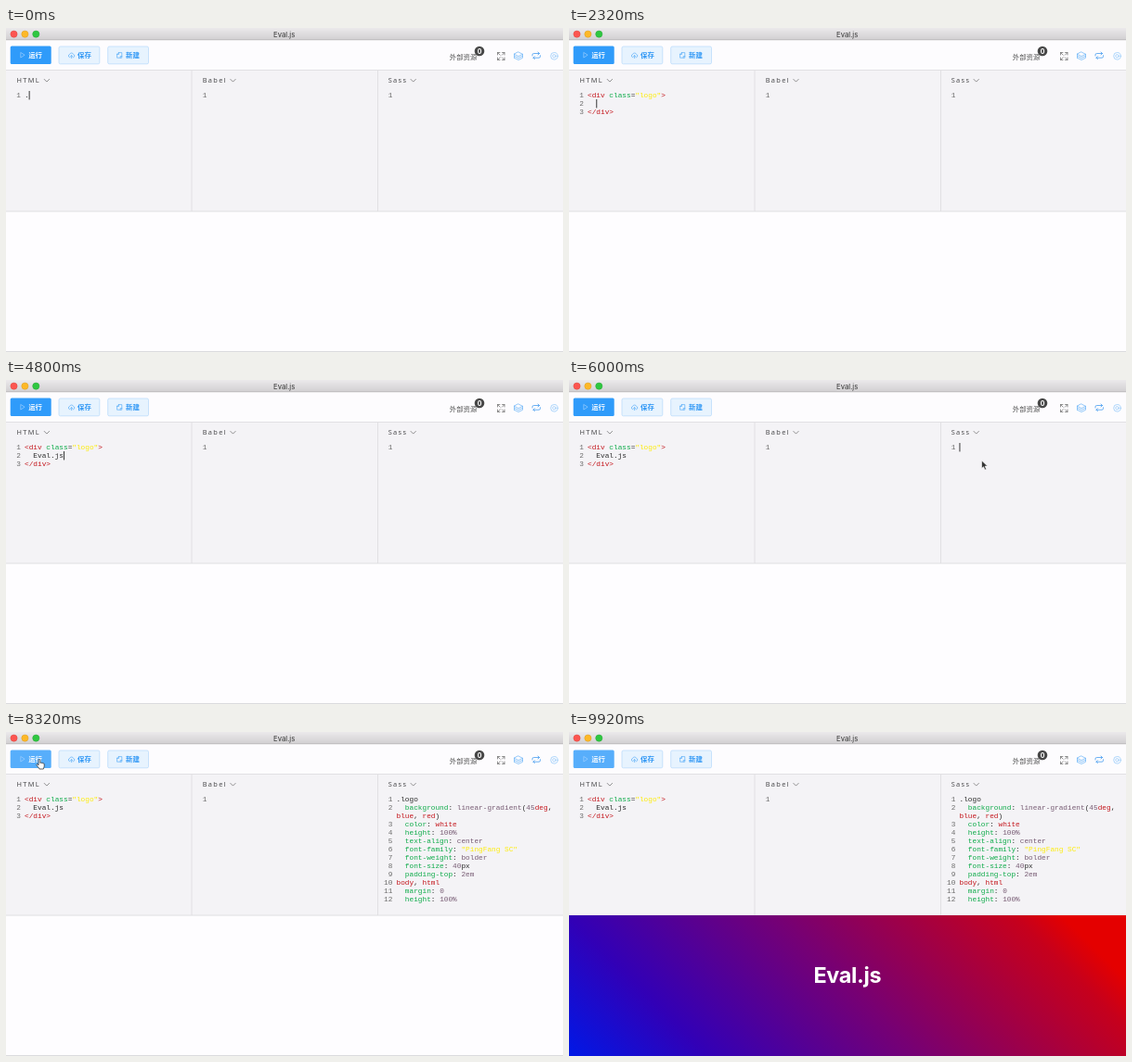
Write an HTML page that moves like this. It is 600 px wide and 350 px high and loops after 10 s.

```html
<!DOCTYPE html>
<html lang="zh">
<head>
<meta charset="utf-8">
<title>Eval.js</title>
<style>
html, body { margin: 0; height: 100%; overflow: hidden; background: #fefdff; }
svg { display: block; width: 600px; height: 350px; }
text { white-space: pre; }
.code { font: 7.78px "Liberation Mono", monospace; fill: #2c2c2c; }
.num { fill: #6c6c6c; text-anchor: end; }
.r { fill: #c4161c; } .g { fill: #0dab49; } .y { fill: #fdec08; } .p { fill: #765a72; }
.head { font: 500 7.4px "Noto Sans", sans-serif; letter-spacing: 1.35px; fill: #4c4c4e; }
.zh { font: 700 7.4px "Noto Sans CJK SC", "Noto Sans CJK", sans-serif; }
.zh .medium { font-weight: 500; }
.line { fill: none; stroke-width: .7; stroke-linejoin: round; stroke-linecap: round; }
</style>
</head>
<body>
<svg viewBox="0 0 600 350">
  <defs>
    <linearGradient id="bar" x2="0" y2="1">
      <stop stop-color="#ebe9eb"/><stop offset="1" stop-color="#d1cfd1"/>
    </linearGradient>
    <linearGradient id="page" gradientUnits="userSpaceOnUse" x1="112.25" y1="462.25" x2="487.75" y2="86.75">
      <stop stop-color="#0018e6"/><stop offset=".2" stop-color="#3200b6"/>
      <stop offset=".5" stop-color="#760074"/><stop offset=".84" stop-color="#c6001c"/>
      <stop offset=".91" stop-color="#e40000"/>
    </linearGradient>
  </defs>

  <rect width="600" height="350" fill="#fefdff"/>
  <rect y="13" width="600" height="33" fill="#fdfcfe"/>
  <rect width="600" height="13" fill="url(#bar)"/>
  <rect y="12.5" width="600" height=".7" fill="#b4b2b4"/>
  <g stroke-width=".5">
    <circle cx="8.5" cy="6.6" r="3.6" fill="#fc5550" stroke="#dd4440"/>
    <circle cx="20.4" cy="6.6" r="3.6" fill="#fdb827" stroke="#dc9c1e"/>
    <circle cx="32.3" cy="6.6" r="3.6" fill="#2fc740" stroke="#22a632"/>
  </g>
  <text x="299.7" y="9.7" text-anchor="middle" font-family="Inter, sans-serif" font-size="7.7" fill="#333">Eval.js</text>

  <rect id="run" x="4.7" y="19.6" width="44" height="19.4" rx="1.5"/>
  <g fill="#e7f3fe" stroke="#b5d9fb" stroke-width=".7">
    <rect x="57" y="20" width="43.8" height="18.8" rx="1.5"/>
    <rect x="109.7" y="20" width="43.8" height="18.8" rx="1.5"/>
  </g>
  <path class="line" stroke="#9ccfff" d="M15.8 26.8v5.2l4-2.6z"/>
  <g class="line" stroke="#5aaef8">
    <path d="M69 31.7h-.3a1.7 1.7 0 0 1 0-3.3 2 2 0 0 1 3.8 0 1.7 1.7 0 0 1 0 3.300h-.4M70.600 32.600v-3m-1 1 1-1 1 1"/>
    <path d="M121.500 26.600h3.300v5.600h-5.200v-3.700zM121.500 26.600v1.900h-1.900M123.200 32.200v-1.700h1.600"/>
  </g>
  <g class="zh" fill="#2f97f5">
    <text x="24.2" y="32.3" fill="#fff">运行</text>
    <text x="77" y="32.3">保存</text>
    <text x="129" y="32.3">新建</text>
    <text class="medium" x="477.8" y="34.2" fill="#555">外部资源</text>
  </g>
  <circle cx="510" cy="25" r="5.3" fill="#484848"/>
  <text x="510" y="27.5" text-anchor="middle" font-family="Inter, sans-serif" font-weight="700" font-size="7" fill="#fff">0</text>
  <path class="line" stroke="#666" d="M529.5 29v-2.5h2.5m2.5 0h2.5v2.5m0 3v2.5h-2.5m-2.5 0h-2.5v-2.5M529.5 26.5l2.7 2.7m4.8-2.7-2.7 2.7m2.7 5.3-2.7-2.7m-4.8 2.7 2.7-2.7"/>
  <path class="line" stroke="#66b2f7" d="M552 26l4.5 2.3-4.5 2.3-4.5-2.3zM547.5 30.3l4.5 2.2 4.5-2.2M547.5 32.3l4.5 2.2 4.5-2.2v-4m-9 0v4"/>
  <path class="line" stroke="#2f90ee" d="M567 30v-1a1.500 1.500 0 0 1 1.500-1.500h6m-1.500-1.500 1.500 1.500-1.500 1.500M575.500 29.700v1a1.500 1.500 0 0 1-1.500 1.500h-6m1.500-1.500-1.500 1.500 1.500 1.500"/>
  <g class="line" stroke="#8cc5f9">
    <circle cx="590.5" cy="30.3" r="3.8"/><circle cx="590.5" cy="30.3" r="1.7"/>
  </g>

  <rect y="45.5" width="600" height="153" fill="#f4f3f6"/>
  <path d="M0 45.5H600M0 198H600M200 46V198M400.5 46V198" stroke="#dfdee1" stroke-width=".9"/>
  <g id="heads" class="head"></g>
  <g id="html" class="code"></g>
  <g id="sass" class="code"></g>
  <rect id="caret" width=".9" height="9.4" fill="#222"/>

  <g id="result">
    <rect y="198" width="600" height="152" fill="url(#page)"/>
    <text x="299.8" y="271.3" text-anchor="middle" font-family="Inter, sans-serif" font-weight="700" font-size="23.4" letter-spacing="-.35" fill="#fff">Eval.js</text>
  </g>
  <path id="edge" d="M0 349.6H600" stroke="#cfced1" stroke-width=".8"/>

  <path id="arrow" d="M0 0v8.6l2-1.9 1.5 3.4 1.6-.7-1.5-3.3h2.7z" fill="#333" stroke="#fff" stroke-width=".6"/>
  <path id="hand" d="M-1 1c0-1.3 1.8-1.3 1.8 0v3c.3-.7 1.5-.6 1.6.2.4-.6 1.4-.4 1.5.4.5-.4 1.3 0 1.3.8v2.2c0 1.2-.9 1.5-.9 2.9h-4.3c-.2-1.3-2.3-2.7-3-4.3-.5-1 .7-1.5 1.3-.8l.7.9z" fill="#fff" stroke="#222" stroke-width=".7"/>
</svg>
<script>
const $ = id => document.getElementById(id);
const CHAR = 4.668, ROW = 9;
const show = (id, on) => $(id).style.display = on ? '' : 'none';

// {g|text} colours a run of code with class g
const paint = s => s.replace(/</g, '&lt;').replace(/\{(\w)\|(.*?)\}/g, '<tspan class="$1">$2</tspan>');

// A row starting with ~ continues the previous line without a number
function listing(x, rows) {
  let n = 0;
  return rows.map((row, i) => {
    const y = 75.2 + i * ROW;
    const num = row[0] === '~' ? '' : `<text class="num" x="${x - 4.2}" y="${y}">${++n}</text>`;
    return num + `<text x="${x}" y="${y}">${paint(row.replace('~', ''))}</text>`;
  }).join('');
}

const rule = (name, value) => `  {g|${name}}: ${value}`;
const style = [
  '.logo',
  rule('background', '{p|linear-gradient}({p|45}{r|deg},'),
  '~{r|blue}, {r|red})',
  rule('color', '{r|white}'),
  rule('height', '{p|100%}'),
  rule('text-align', '{p|center}'),
  rule('font-family', '{y|"PingFang SC"}'),
  rule('font-weight', '{p|bolder}'),
  rule('font-size', '{p|40}px'),
  rule('padding-top', '{p|2em}'),
  '{r|body}, {r|html}',
  rule('margin', '{p|0}'),
  rule('height', '{p|100%}')
];
const open = '{r|<div} {g|class}={y|"logo"}{r|>}', close = '{r|</div>}';

$('heads').innerHTML = [['HTML', 11.5, 41.2], ['Babel', 211.7, 241.8], ['Sass', 411.7, 436]].map(([name, x, arrow]) =>
  `<text x="${x}" y="59.4">${name}</text><path class="line" stroke="#666" d="M${arrow} 55.4l2.700 2.700 2.700-2.700"/>`
).join('') + `<g class="code" letter-spacing="0" style="letter-spacing:0">${listing(220.5, [''])}</g>`;

const EXPAND = 1480, ENTER = 1960, TYPE = 3680, FOCUS = 5920, PASTE = 6560, HOVER = 7400, RUN = 8400;

// Pointer stops: time, x, y
const path = [[5120, 112, 82], [5600, 428, 82], [5840, 444.5, 87], [6960, 444.5, 87],
  [7440, 36, 29.5], [8640, 36, 29.5], [8960, 38, -12]];

function pointer(t) {
  const i = path.findIndex(p => p[0] > t);
  if (i < 1 || t > PASTE && t < 6960) return null;
  const [a, b] = [path[i - 1], path[i]];
  const u = (t - a[0]) / (b[0] - a[0]), e = u * u * (3 - 2 * u);
  return [a[1] + (b[1] - a[1]) * e, a[2] + (b[2] - a[2]) * e];
}

// Rows of the first editor, caret column and row, and time of the last key
function typing(t) {
  if (t < EXPAND) {
    const n = t < 320 ? 0 : Math.min(4, 1 + Math.floor((t - 320) / 160));
    return [['.' + 'logo'.slice(0, n)], n + 1, 0, n ? 160 + n * 160 : -450];
  }
  if (t < ENTER) return [[open + close], 18, 0, EXPAND];
  const n = Math.max(0, Math.min(7, Math.floor((t - TYPE) / 130) + 1));
  return [[open, '  ' + 'Eval.js'.slice(0, n), close], 2 + n, 1, n ? TYPE + (n - 1) * 130 : ENTER];
}

let shown = '';
function frame(now) {
  const t = now % 10000;
  let [rows, col, row, key] = typing(t), left = 20;
  const pasted = t >= PASTE;
  if (t >= FOCUS) {
    left = 420.5;
    [col, row, key] = pasted ? [14, 12, PASTE] : [0, 0, FOCUS];
  }
  const state = rows.join() + pasted;
  if (state !== shown) {
    $('html').innerHTML = listing(20, rows);
    $('sass').innerHTML = listing(420.5, pasted ? style : ['']);
    shown = state;
  }
  $('caret').setAttribute('x', left + col * CHAR);
  $('caret').setAttribute('y', 68 + row * ROW);
  show('caret', t < 8240 && (t - key) % 1060 < 530);

  const at = pointer(t), onRun = at && t >= HOVER && at[1] > 20;
  show('arrow', at && !onRun);
  show('hand', onRun);
  if (at) for (const id of ['arrow', 'hand']) $(id).setAttribute('transform', `translate(${at})`);
  $('run').setAttribute('fill', t >= HOVER ? '#57aefb' : '#2f9bfa');
  show('result', t >= RUN);
  show('edge', t < RUN);
  requestAnimationFrame(frame);
}
requestAnimationFrame(frame);
</script>
</body>
</html>
```
